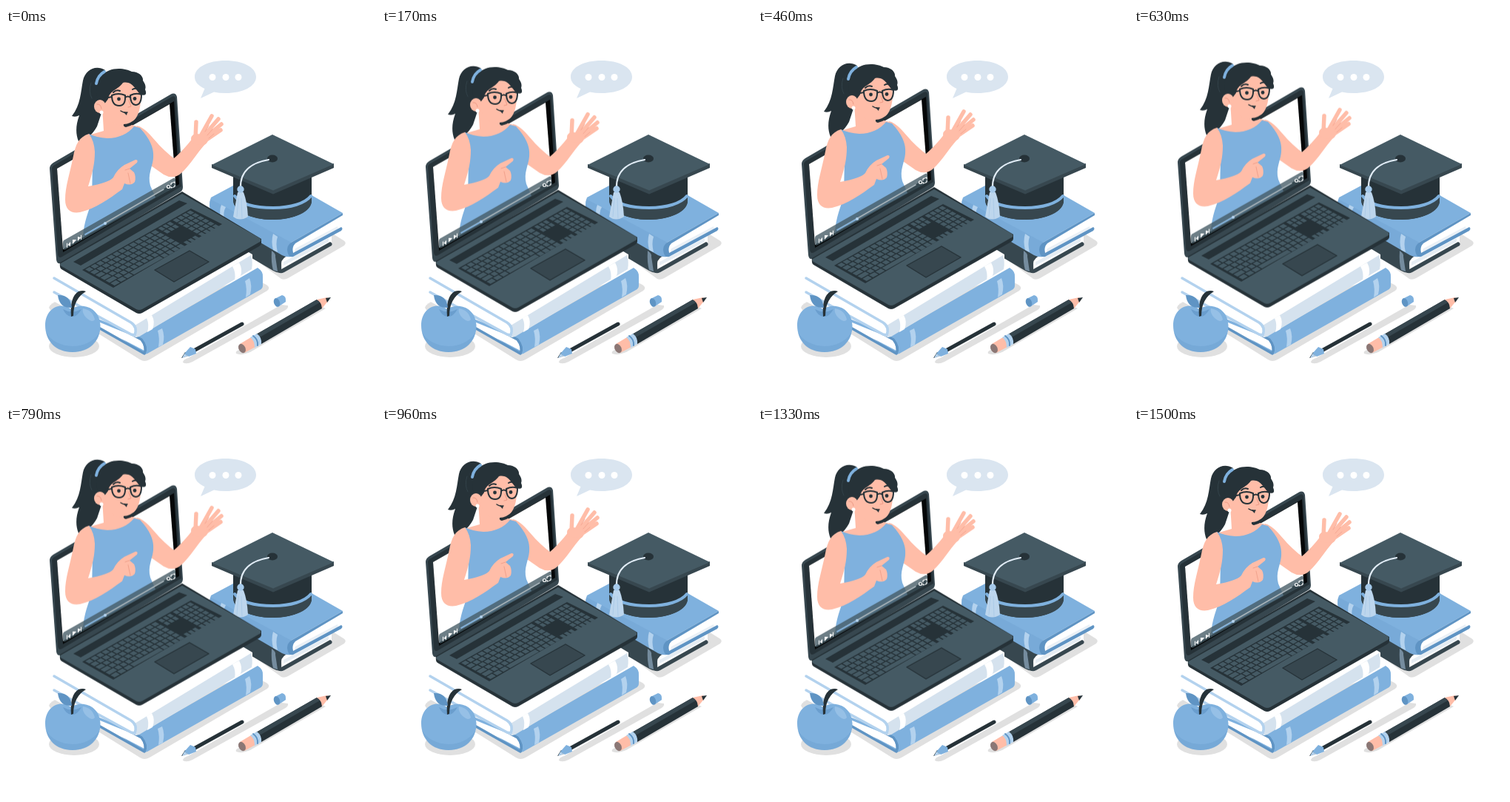
Animation of 500 by 500 pixels, one loop 1.54 s. Source, as an HTML page:

```html
<!DOCTYPE html>
<html lang="en">
<head>
<meta charset="utf-8">
<title>Online lesson</title>
<style>
  html, body { margin: 0; width: 100%; height: 100%; overflow: hidden; background: #fff; }
  svg { display: block; width: 100vw; height: 100vh; }
  .blue { fill: #7fb1de; }
  .pale { fill: #d5e2ee; }
  .sky { fill: #b3d2ee; }
  .deep { fill: #5f94c4; }
  .ink { fill: #263238; }
  .slate { fill: #37474f; }
  .steel { fill: #455a64; }
  .skin { fill: #ffbda8; }
  .white { fill: #fff; }
  .shade { fill: #e0e0e0; }
  .line { fill: none; stroke-linecap: round; stroke-linejoin: round; }
  #float { animation: float 1540ms linear infinite; }
  @keyframes float {
    0%, 97.4%, 100% { transform: translateY(0); }
    46.1% { transform: translateY(-9.4px); }
    94.8% { transform: translateY(.5px); }
  }
</style>
</head>
<body>
<svg viewBox="0 0 500 500" xmlns="http://www.w3.org/2000/svg">
  <g id="shadows" class="shade">
    <path d="M330 308L372 339Q377 341 383 337L457 294Q461 290 456 287L440 277Z"/>
    <path d="M120 410L181 448Q187 452 194 448L353 355Q358 351 352 347L330 336Z"/>
    <ellipse cx="92" cy="430" rx="34" ry="15"/>
    <path d="M58 378Q60 371 72 369L84 376L66 390Z"/>
    <path d="M239 452Q239 448 246 446L372 374L381 375Q382 379 376 382L252 451Q244 455 239 452Z"/>
    <path d="M311 440Q309 436 318 434L425 376L432 379L330 438Q318 443 311 440Z"/>
  </g>

  <g id="bubble">
    <path fill="#dae5f0" d="M296.500 44C320 44 338 53 338 66S320 88 297 88Q288 88 281 86.500L263 95L268.500 82C260 78 255 73 255 66C255 53 273 44 296.500 44Z"/>
    <g class="white"><circle cx="279" cy="66.500" r="4.500"/><circle cx="297" cy="66.500" r="4.500"/><circle cx="314" cy="66.500" r="4.500"/></g>
  </g>

  <g id="capBooks">
    <path class="slate" d="M283 254L371 302V331Q366 331 361 328L290 286Z"/>
    <path class="white" d="M372 312L440 276V291L373 326Z"/>
    <path fill="#e6edf3" d="M375 316L436 284V289L375 321Z"/>
    <path class="sky" d="M337 285L346 291V306L337 313Z" opacity=".0"/>
    <path class="slate" d="M368 304L385 305Q372 311 372 318V326L438 289Q442 291 440 294L376 330Q370 333 367 329Z"/>
    <path class="sky" d="M359 301Q365 305 364 309L367 329L361 327Q358 317 359 301Z" opacity=".5"/>
    <path class="blue" d="M277 229L350 190L455 250L385 290Q381 300 385 309Q379 310 373 307L279 252Q272 241 277 229Z"/>
    <path class="deep" opacity=".22" d="M276 231L386 290Q380 299 385 309Q379 310 373 307L279 252Q273 241 276 231Z"/>
    <path class="white" d="M390 291Q384 298 388 305L450 273L447 260Z"/>
    <path class="pale" d="M391 298L448 268L449 273L389 304Z" opacity=".5"/>
    <path class="deep" d="M385 290L455 250V253L391 291Q386 296 388 304L453 269Q456 271 453 274L388 309Q381 311 380 300Q380 294 385 290Z"/>
    <path class="sky" d="M291 239L297 242Q293 249 295 258L290 256Q288 246 291 239ZM361 278L367 282Q364 291 367 303L361 300Q358 288 361 278Z"/>
  </g>

  <g id="cap">
    <path class="ink" d="M307 190H413V233C413 247 390 259 360 259S307 246 307 232Z"/>
    <path class="slate" d="M308 226C316 239 337 244 361 244S405 238 413 226V234C413 248 390 259 360 259S307 247 307 233Z"/>
    <path class="line" d="M309 227C317 238 337 243 361 243S404 237 412 227" stroke="#7fb1de" stroke-width="4" stroke-linecap="butt"/>
    <path class="slate" d="M278 184L361 219L443 183V189L361 224.500L278 189Z"/>
    <path class="steel" d="M360 144L443 184L361 219.500L278 185Z"/>
    <ellipse class="ink" cx="360" cy="176.500" rx="7" ry="5"/>
    <path class="line" d="M355 178C337 181 316 190 317 216" stroke="#e2edf7" stroke-width="2.200"/>
    <path fill="#bdd6ed" d="M313 222L307 255Q316 262 327 255Q326 235 321 222Z"/>
    <path class="line" d="M314 230L312 255M318 230L319 257" stroke="#a7c8e6" stroke-width=".8"/>
    <circle cx="317" cy="218" r="4.700" fill="#a5c9ea"/>
  </g>

  <g id="deskBooks">
    <path class="white" d="M66 362L187 432V441L66 370Z"/>
    <path class="blue" d="M112 388L180 416L340 324Q348 329 347 337V348Q347 352 343 354L191 440Q187 442 183 439Z"/>
    <path class="white" d="M120 395L181 420Q186 426 187 436L120 401Z"/>
    <path class="line" d="M120 402L187 440Q191 431 183 421L120 387" stroke="#5f94c4" stroke-width="3.500"/>
    <path class="sky" d="M205 409L211 406Q215 416 212 428L206 431Q208 419 205 409ZM323 342L329 338Q333 348 330 360L324 364Q326 352 323 342Z"/>
    <path class="white" d="M65 337L240 250L333 306V325L176 418L65 358Z"/>
    <path class="pale" d="M174 402L331 307Q334 316 332 326L180 417Q175 419 170 416Q178 410 174 402Z"/>
    <path class="white" d="M190 392L197 388Q202 397 198 407L191 411Q194 401 190 392ZM306 322L315 317Q320 326 317 335L309 340Q311 331 306 322Z"/>
    <path class="line" d="M65 338L169 398Q178 404 174 415L169 414L65 357" stroke="#b3d2ee" stroke-width="3.500" stroke-linecap="butt"/>
  </g>

  <g id="apple">
    <path class="blue" d="M88 380C103 370 127 378 127.500 402C128 423 112 438 90 438C68 438 53 423 53 402C53 379 73 369 88 380Z"/>
    <path class="deep" opacity=".28" d="M54 411C66 434 109 438 126 412C123 429 108 438 90 438C71 438 58 429 54 411Z"/>
    <path fill="#96c0e6" d="M104 379Q117 381 120 394Q117 399 109 392Q102 385 104 379Z"/>
    <path class="deep" d="M77 380Q89 387 102 380Q96 391 88 390Q81 389 77 380Z" opacity=".65"/>
    <path class="ink" d="M88 390Q86 363 98 356Q104 354 108 356Q91 366 91 389Z"/>
    <path class="deep" d="M70 361Q87 360 89 378Q72 379 70 361Z"/>
  </g>

  <g id="tools">
    <path class="line" d="M252 437L319 400" stroke="#263238" stroke-width="5"/>
    <path class="ink" d="M237 446L242 438L249 442Z"/>
    <path class="blue" d="M241 440L249 431L256 434L257 440L247 444Z"/>
    <path class="sky" d="M238 446L241 440L246 443Z"/>
    <path class="blue" d="M363 366L373 361Q379 362 378 370L369 376Q362 376 363 366Z"/>
    <ellipse class="deep" cx="366" cy="371" rx="4" ry="6" transform="rotate(-20 366 371)"/>
    <path class="ink" d="M338 414L420 367Q427 369 427 379L345 427Z"/>
    <path class="slate" d="M338 414L420 367L424 371L341 419Z"/>
    <path class="skin" d="M420 367L434 364L436 368L427 379Q427 371 420 367Z"/>
    <path class="ink" d="M432 365L439 364L434 371Z"/>
    <path class="skin" d="M316 427L331 418Q337 421 337 431L322 439Z"/>
    <path class="sky" d="M330 418L339 413Q346 418 345 427L336 432Q336 422 330 418Z"/>
    <path class="line" d="M334 416Q341 421 340 429" stroke="#5f94c4" stroke-width="2"/>
    <ellipse cx="319" cy="433" rx="4.500" ry="6.500" fill="#8b7775" transform="rotate(-28 319 433)"/>
  </g>

  <g id="float">
    <g id="screen">
      <path class="slate" d="M59 190Q59 185 64 182L222 90Q229 86 231 93L239 215Q239 220 235 222L77 317Q69 321 68 313Z"/>
      <path class="ink" d="M62 190Q62 187 66 185L224 93Q228 91 229 95L237 214L76 309Q71 312 70 306Z"/>
      <path fill="#050708" d="M69 190L227 99L234 211L77 303Z"/>
      <path class="white" d="M69 190L221 103L229 208L77 299Z"/>
    </g>

    <g id="base">
      <path class="ink" d="M73 317L238 221L345 285V291Q345 293 342 295L184 385Q180 387 176 385L75 326Q72 324 73 317Z"/>
      <path class="steel" d="M74 318L238 224L343 284Q346 287 343 289L184 380Q180 382 176 380L75 322Q72 320 74 318Z"/>
      <path class="ink" d="M91 316L234 233L245 237L101 321Z"/>
      <path class="ink" d="M103 327L250 244L292 265L145 351Z"/>
      <g id="keys" class="steel" transform="matrix(1.46 -.82 .41 .225 104 327)"></g>
      <path class="slate" d="M201 327L248 301L274 316L227 343Z" stroke="#263238" stroke-width="1.200"/>
    </g>

    <g id="teacher">
      <path class="ink" d="M134 57C121 49 107 57 104 71C101 86 101 104 89 119Q94 121 99 118C94 132 94 143 98 153Q113 151 123 133L132 106Z"/>
      <path class="skin" d="M130 106L132 139L111 145L140 162L182 134L166 130V116Z"/>
      <path class="skin" d="M177 132C194 137 201 157 227 176Q239 166 253 148L269 157C259 168 248 186 238 195Q227 206 213 198L193 184Z"/>
      <path class="blue" d="M112 143Q122 148 137 149C152 149 165 143 173 133L181 135C190 145 201 159 199 176C198 188 191 198 195 213L202 229L104 283C105 262 112 247 116 234L117 180Z"/>
      <path class="skin" d="M112 143C99 147 94 157 91 173C86 198 80 214 80 232C80 246 88 251 100 249C121 244 139 231 157 218L160 210Q169 214 174 208Q176 201 173 195L167 190L177 182Q179 178 175 178L160 185Q150 191 145 202Q139 209 111 214C117 195 120 184 120 167Q119 152 112 143Z"/>
      <path class="line" d="M161 192L167 190M165 196L168 210" stroke="#ed9b86" stroke-width=".8"/>

      <g class="line" stroke="#ffbda8" stroke-width="5.500">
        <path d="M256 149L257 127M264 144L278 119M267 146L287 123M268 149L291 130M268 153L290 138"/>
        <path d="M257 150L266 151" stroke-width="14"/>
      </g>
      <path class="line" d="M269 140L274 132M272 145L279 137M274 149L281 143" stroke="#f3a38f" stroke-width=".8"/>

      <path class="skin" d="M133 80C145 66 178 66 181 85C184 103 180 123 167 130C154 137 136 127 133 110Z"/>
      <path class="ink" d="M159 130Q168 130 177 121Q174 132 162 134Q158 133 159 130Z"/>
      <path class="ink" d="M128 66C139 51 161 54 170 59C180 59 186 66 185 71Q190 78 188 83Q192 93 182 90C175 84 171 71 158 74C151 84 140 84 138 96L132 104C119 100 121 78 128 66Z"/>
      <ellipse class="skin" cx="127" cy="106" rx="8" ry="9"/>
      <path class="line" d="M123 103Q128 102 129 109" stroke="#ed9b86" stroke-width="1"/>
      <circle class="white" cx="129" cy="114" r="2.500"/>
      <path class="line" d="M133 59Q124 64 122 75" stroke="#7fb1de" stroke-width="4"/>
      <path class="line" d="M115 74Q111 86 116 95" stroke="#37474f" stroke-width=".8"/>

      <g class="line" stroke="#263238" stroke-width="2">
        <path d="M145 87Q149 83 154 85M171 83Q176 80 179 84"/>
        <path d="M143 91Q152 87 161 91Q162 105 153 105Q143 105 143 91ZM168 91Q176 87 183 90Q183 104 175 104Q168 103 168 91ZM161 94Q165 91 168 94M143 93L133 95"/>
        <path d="M155 112Q159 115 164 114" stroke-width="1.500"/>
      </g>
      <path class="ink" d="M158 113L164 114L163 118Z"/>
      <circle class="ink" cx="152.500" cy="96" r="2.400"/>
      <circle class="ink" cx="174" cy="95.500" r="2.400"/>
      <path class="line" d="M166 98L169 106L165 107" stroke="#ed9b86" stroke-width="1"/>
    </g>

    <g id="player">
      <path fill="#455a64" opacity=".78" d="M78 287L226 203Q229 202 229 205L230 214L81 299Q77 301 77 297V290Q77 288 78 287Z"/>
      <path class="line" d="M107 279L213 218" stroke="#a8b4ba" stroke-width="1.500"/>
      <path class="line" d="M107 279L134 264" stroke="#7fb1de" stroke-width="1.500"/>
      <circle class="sky" cx="134" cy="264" r="2"/>
      <path class="white" d="M82 291V297L83 296.500V290.500ZM83.500 293L87 289V295ZM90 286V292L95 286ZM97 282V288L101 283ZM101 280V286L102 285.500V279.500Z"/>
      <g class="line" stroke="#fff" stroke-width="1.200">
        <circle cx="219.500" cy="214.500" r="2"/>
        <path d="M223 212V210L225 209M226.500 208.500L228 208V210M228 212V214L226.500 215M225 215.500L223 216V214.500"/>
      </g>
    </g>
  </g>
</svg>
<script>
  const keys = document.getElementById("keys");
  const rowStep = 100 / 6;

  function addKey(x, row, width) {
    const key = document.createElementNS("http://www.w3.org/2000/svg", "rect");
    const box = { x: x + 0.5, y: row * rowStep + 2, width: width - 1, height: rowStep - 3.2 };
    for (const name in box) key.setAttribute(name, box[name]);
    keys.append(key);
  }

  function addRun(x, row, count, width) {
    for (let i = 0; i < count; i++) addKey(x + i * width, row, width);
  }

  for (let row = 0; row < 6; row++) {
    if (row < 5) {
      const lead = 5 + row * 0.8;
      addKey(1, row, lead);
      addRun(1 + lead, row, 12, (66 - lead) / 12);
    } else {
      addRun(1, row, 3, 6);
      addKey(19, row, 28);
      addRun(47, row, 4, 5);
    }
    if (row < 2 || row === 5) addRun(68.5, row, 3, 4);
    addRun(82, row, 4, 4.3);
  }
</script>
</body>
</html>
```
